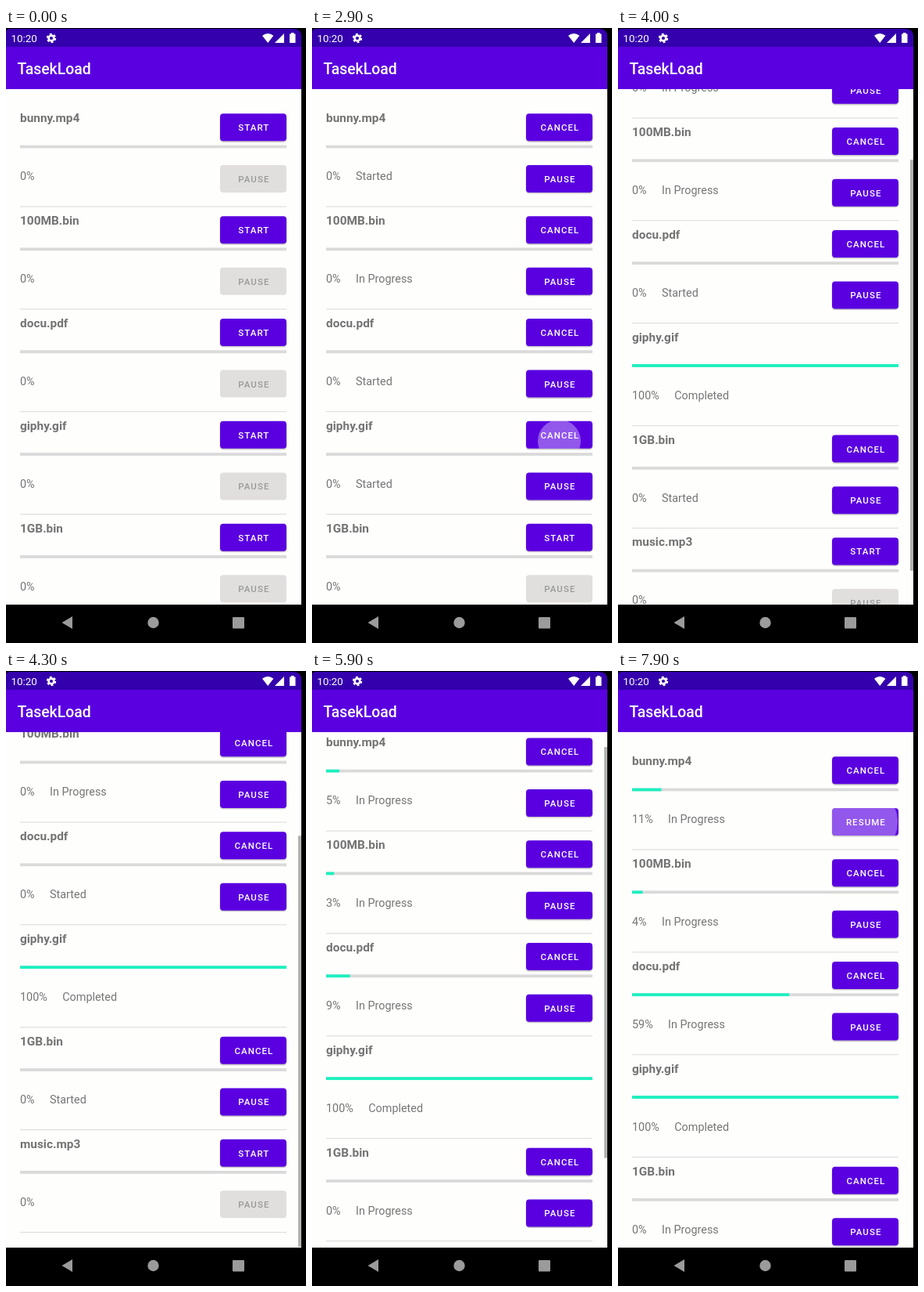
These frames come from a looping animation (384x785 px, 8000 ms). An HTML page:

```html
<!DOCTYPE html>
<html lang="en">
<head>
<meta charset="utf-8">
<title>Download list</title>
<style>
  html, body { margin: 0; width: 100%; height: 100%; overflow: hidden; background: #000; }
  svg { display: block; width: 100%; height: 100%; font-family: Roboto, sans-serif; }
  .name { font-size: 15.4px; font-weight: 700; fill: #737373; }
  .info { font-size: 14.4px; fill: #757575; white-space: pre; }
  .label { font-size: 11.5px; font-weight: 500; letter-spacing: 1.05px; text-anchor: middle; }
</style>
</head>
<body>
<svg id="stage" viewBox="0 0 384 785">
  <defs>
    <clipPath id="list"><rect y="78" width="378" height="658"/></clipPath>
    <clipPath id="button"><rect width="85" height="35" rx="4"/></clipPath>
  </defs>
  <rect width="384" height="785"/>
  <rect y="78" width="378" height="658" fill="#fefefd"/>
  <g clip-path="url(#list)">
    <g id="rows"></g>
    <rect id="thumb" x="374" width="4" height="524.5"/>
  </g>
  <path d="M0 24V6Q0 1 5 1H368Q378 1 378 11V24Z" fill="#3400ad"/>
  <rect y="24" width="378" height="54" fill="#5a00e0"/>
  <text x="14.5" y="59" font-size="19.4" font-weight="500" fill="#fff">TasekLoad</text>
  <g fill="#fff">
    <text x="6.5" y="18" font-size="13.4">10:20</text>
    <circle cx="58" cy="13" r="3.4" fill="none" stroke="#fff" stroke-width="2.6"/>
    <circle cx="58" cy="13" r="5.2" fill="none" stroke="#fff" stroke-width="2" stroke-dasharray="2.8 2.645"/>
    <path d="M328 9.8Q335.2 4.2 342.4 9.8L335.2 19Z"/>
    <path d="M344 19L356 7V19Z"/>
    <path d="M363 7.5H365V6H368.5V7.5H370.5V19H363Z"/>
  </g>
  <g fill="#9b9b9b">
    <path d="M71.5 759L85 751V767Z"/>
    <circle cx="188.5" cy="759" r="7.2"/>
    <rect x="290" y="752" width="15" height="14.5" rx="1"/>
  </g>
</svg>
<script>
const LOOP = 8000, STEP = 100, PITCH = 130.85, SCROLL = 167;
const ACCENT = '#5a00e0';

// tap: start pressed, run: first "In Progress", done: finished, keys: [ms, percent]
const files = [
  { name: 'bunny.mp4', tap: 1300, run: 3400, pause: 7700,
    keys: [[4100, 0], [6600, 8], [7100, 9], [7200, 10], [7300, 10], [7400, 11]] },
  { name: '100MB.bin', tap: 1900, run: 2500,
    keys: [[4100, 0], [4800, 3], [5500, 3], [6000, 4]] },
  { name: 'docu.pdf', tap: 2400, run: 4400,
    keys: [[5100, 0], [5200, 1], [5400, 1], [6600, 21], [7100, 40], [7200, 46],
           [7300, 46], [7400, 55], [7500, 55], [7900, 59]] },
  { name: 'giphy.gif', tap: 2800, run: 3300, done: 3500, keys: [[3400, 0], [3500, 100]] },
  { name: '1GB.bin', tap: 3300, run: 4600, keys: [[0, 0]] },
  { name: 'music.mp3', keys: [[0, 0]] }
];

const $ = id => document.getElementById(id);

function add(parent, tag, attrs, text) {
  const el = document.createElementNS('http://www.w3.org/2000/svg', tag);
  set(el, attrs);
  if (text) el.textContent = text;
  return parent.appendChild(el);
}

function set(el, attrs) {
  for (const key in attrs) el.setAttribute(key, attrs[key]);
}

const clamp = x => Math.min(1, Math.max(0, x));
const ease = (t, from, to) => Math.sin(clamp((t - from) / (to - from)) * Math.PI / 2);
const after = (t, mark) => mark !== undefined && t >= mark;

function percent(keys, t) {
  if (t <= keys[0][0]) return keys[0][1];
  for (let i = 1; i < keys.length; i++) {
    const [t0, a] = keys[i - 1], [t1, b] = keys[i];
    if (t <= t1) return Math.floor(a + (b - a) * (t - t0) / (t1 - t0));
  }
  return keys[keys.length - 1][1];
}

function makeButton(parent, y) {
  const g = add(parent, 'g', { transform: `translate(274 ${y})` });
  return {
    g,
    shadow: add(g, 'rect', { x: -0.4, y: 1.6, width: 85.8, height: 35, rx: 4.4, opacity: 0.2 }),
    face: add(g, 'rect', { width: 85, height: 35, rx: 4 }),
    ripple: add(g, 'circle', { fill: '#fff', opacity: 0.34, 'clip-path': 'url(#button)' }),
    label: add(g, 'text', { class: 'label', x: 43.4, y: 22 })
  };
}

function drawButton(b, text, enabled, age) {
  b.label.textContent = text;
  set(b.label, { fill: enabled ? '#fff' : '#999' });
  set(b.face, { fill: enabled ? ACCENT : '#e0dfde' });
  set(b.shadow, { visibility: enabled ? 'inherit' : 'hidden' });
  const live = age >= 0 && age < 300, k = age / 200;
  set(b.ripple, live
    ? { r: 9 + 37 * k, cx: 47 - 9 * k, cy: 33 - 15 * k, visibility: 'inherit' }
    : { visibility: 'hidden' });
}

function makeRow(file, i) {
  const g = add($('rows'), 'g', { transform: `translate(0 ${i * PITCH})` });
  add(g, 'text', { class: 'name', x: 18, y: 120.3 }, file.name);
  add(g, 'rect', { x: 18, y: 149.6, width: 341, height: 3.8, fill: '#dadada' });
  add(g, 'rect', { x: 18, y: 227.5, width: 341, height: 1.1, fill: '#dcdcdc' });
  const info = add(g, 'text', { class: 'info', x: 18, y: 194.3 });
  return {
    file,
    bar: add(g, 'rect', { x: 18, y: 149.6, height: 3.8, fill: '#1cf0c0' }),
    amount: add(info, 'tspan', {}),
    status: add(info, 'tspan', { dx: 19.4 }),
    main: makeButton(g, 109.3),
    side: makeButton(g, 174.9)
  };
}

function drawRow(row, t) {
  const { tap, run, done, pause, keys } = row.file;
  const started = after(t, tap + 100), finished = after(t, done);
  const p = percent(keys, t);
  set(row.bar, { width: 3.41 * p });
  row.amount.textContent = p + '%';
  row.status.textContent = finished ? 'Completed'
    : after(t, run) ? 'In Progress'
    : started ? 'Started' : '';
  drawButton(row.main, started ? 'CANCEL' : 'START', true, t - tap);
  drawButton(row.side, after(t, pause + 100) ? 'RESUME' : 'PAUSE', started, t - pause);
  for (const b of [row.main, row.side]) set(b.g, { visibility: finished ? 'hidden' : 'visible' });
}

// Scrollbar shows while scrolling, waits 300 ms, then fades
const thumbAlpha = (t, from, to) => t < from ? 0 : 1 - clamp((t - to - 300) / 250);

const rows = files.map(makeRow);

function draw(t) {
  const y = SCROLL * (ease(t, 3685, 4350) - ease(t, 5330, 6200));
  set($('rows'), { transform: `translate(0 ${-y})` });
  const alpha = Math.max(thumbAlpha(t, 3685, 4350), thumbAlpha(t, 5330, 6200));
  set($('thumb'), { y: 78 + y * 658 / 825, opacity: 0.3 * alpha });
  rows.forEach(row => drawRow(row, t));
}

const begin = performance.now();
function tick() {
  const t = (performance.now() - begin) % LOOP;
  draw(Math.floor(t / STEP) * STEP);
  requestAnimationFrame(tick);
}
tick();
</script>
</body>
</html>
```
